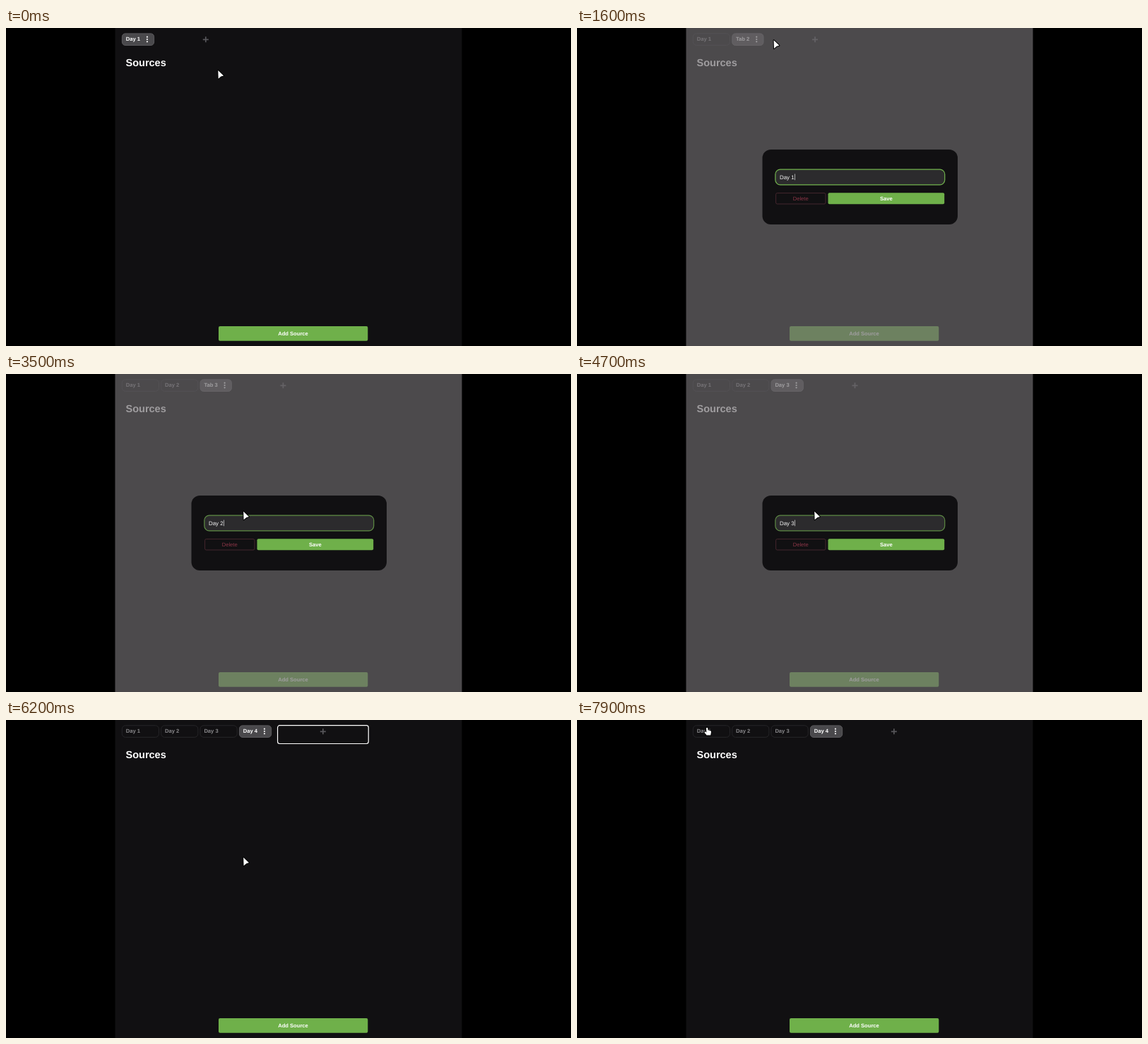
An HTML page that plays this animation: 800x450 px, repeating every 8 s.

```html
<!DOCTYPE html>
<html lang="en">
<head>
<meta charset="utf-8">
<title>Day tabs</title>
<style>
  html, body { margin: 0; width: 100%; height: 100%; overflow: hidden; background: #000; }
  svg { display: block; width: 100vw; height: 100vh; }
  text { font: 700 7.6px "Liberation Sans", Arial, sans-serif; text-rendering: geometricPrecision; }
</style>
</head>
<body>
<svg id="stage" viewBox="0 0 800 450"></svg>
<script>
const LOOP = 8000;
const PANEL = '#111012', GREEN = '#6fb04a';
const stage = document.getElementById('stage');

// Each session adds one tab and renames it in the dialog.
const sessions = [
  { open: 1530, erase: 2000, type: 2300, save: 2580, close: 2650 },
  { open: 3450, erase: 4000, type: 4300, save: 4680, close: 4750 },
  { open: 5000, erase: 5300, type: 5600, save: 5880, close: 5950 }
];
const RING_OFF = 6800;

// Pointer moves: start, end, from, to
const moves = [
  [50, 1050, [300.3, 60], [278.6, 17.3]],
  [1620, 2300, [278.6, 17.3], [336.2, 194.5]],
  [6680, 7700, [336.2, 194.5], [184, 10.6]]
];

const clamp = v => Math.min(1, Math.max(0, v));
const ease = v => v * v * (3 - 2 * v);

const rect = (x, y, w, h, r, fill, stroke = 'none', width = 1) =>
  `<rect x="${x}" y="${y}" width="${w}" height="${h}" rx="${r}" fill="${fill}" stroke="${stroke}" stroke-width="${width}"/>`;
const label = (x, y, str, fill = '#fff', style = '') =>
  `<text x="${x}" y="${y}" fill="${fill}" style="${style}">${str}</text>`;
const centred = (x, y, str, fill, style = '') =>
  label(x, y, str, fill, 'text-anchor:middle;' + style);

function tab(x, name, active) {
  const w = name.startsWith('Tab') ? 44.2 : 45.2;
  if (!active) return rect(x + .3, 7.8, 52.2, 16.6, 5, 'none', '#262528') + label(x + 5.7, 18.1, name, '#89888b');
  const dots = [12.7, 16, 19.3].map(y => `<circle cx="${x + w - 9.3}" cy="${y}" r="1.1" fill="#fff"/>`).join('');
  return rect(x + .4, 7.9, w, 16.6, 4.5, '#4a494c', '#5b5a5d') + label(x + 5.7, 18.1, name) + dots;
}

function page(t, ring) {
  const names = ['Day 1'];
  sessions.forEach((s, i) => {
    if (t >= s.open) names.push((t >= s.save ? 'Day ' : 'Tab ') + (i + 2));
  });
  const last = names.length - 1;
  const plus = 282.8 + 55.35 * last - (names[last].startsWith('Tab') ? 1.1 : 0);
  return rect(154.5, 0, 491, 450, 0, PANEL)
    + names.map((name, i) => tab(164 + 55.35 * i, name, i === last)).join('')
    + `<path d="M${plus - 4} 16.3h8m-4 -4v8" stroke="#57565a" stroke-width="1.7"/>`
    + (ring ? rect(plus - 64.3, 7.7, 128.7, 25.8, 3, 'none', '#fff', 1.2) : '')
    + label(169.5, 54, 'Sources', '#fff', 'font-size:14.5px')
    + rect(301, 422, 211.3, 20.8, 2, GREEN)
    + centred(406.5, 434.6, 'Add Source', '#fff');
}

function dialog(t, s, i) {
  const value = 'Day ' + (t < s.erase ? i + 1 : t < s.type ? '' : i + 2);
  const focus = t < s.save ? clamp((t - s.open) / 70) : .7;
  const caret = t < s.erase || t >= s.type ? 308.3 : 304;
  return rect(154.5, 0, 491, 450, 0, 'rgba(108,105,108,.65)')
    + rect(262.5, 172, 276.5, 106, 12, PANEL)
    + rect(280.3, 199.5, 241, 23, 7.5, '#2c2b2d')
    + `<g opacity="${focus}">${rect(280.9, 200.1, 239.8, 21.8, 7, 'none', GREEN, 1.2)}</g>`
    + label(287, 213.6, value, '#f4f4f4', 'font-weight:400;font-size:7.9px;white-space:pre')
    + rect(caret, 206.5, .7, 8.7, 0, '#ddd')
    + rect(281.6, 233.6, 70.4, 15.4, 2, 'none', '#4b2932', .9)
    + centred(316.7, 243.7, 'Delete', '#8b3547', 'font-weight:400')
    + rect(355.5, 233.2, 164.7, 16.1, 2, GREEN)
    + centred(437.8, 243.7, 'Save', '#fff');
}

function pointer(t, x, y, hand) {
  const d = hand
    ? 'M-1 .8Q.2 -.6 1.2 .8L1.5 3.6L4.6 4.3Q6.2 4.8 6 6.5L5.2 11H-.5L-3.5 7.2Q-3.9 5.6 -2.2 6L-.7 6.8Z'
    : 'M0 0L7.8 7.4L4.2 8.5L.4 11.8Z';
  return `<path transform="translate(${x} ${y})" d="${d}" fill="#fff" stroke="#000" stroke-width="2" stroke-linejoin="round" paint-order="stroke"/>`;
}

function pointerAt(t) {
  let pos = moves[0][2];
  for (const [start, end, from, to] of moves) {
    if (t < start) break;
    const k = ease(clamp((t - start) / (end - start)));
    pos = from.map((v, i) => v + (to[i] - v) * k);
  }
  return pos;
}

function draw(t) {
  const current = sessions.findIndex(s => t >= s.open && t < s.close);
  const ring = current < 0 && t >= sessions[0].close && t < RING_OFF;
  const [x, y] = pointerAt(t);
  const overTab = t > RING_OFF && x < 217 && y < 25;
  const overPlus = t < sessions[0].open && y < 34;
  stage.innerHTML = page(t, ring)
    + (current < 0 ? '' : dialog(t, sessions[current], current))
    + pointer(t, x, y, overTab || overPlus);
}

const begin = performance.now();
function tick() {
  draw((performance.now() - begin) % LOOP);
  requestAnimationFrame(tick);
}
tick();
</script>
</body>
</html>
```
